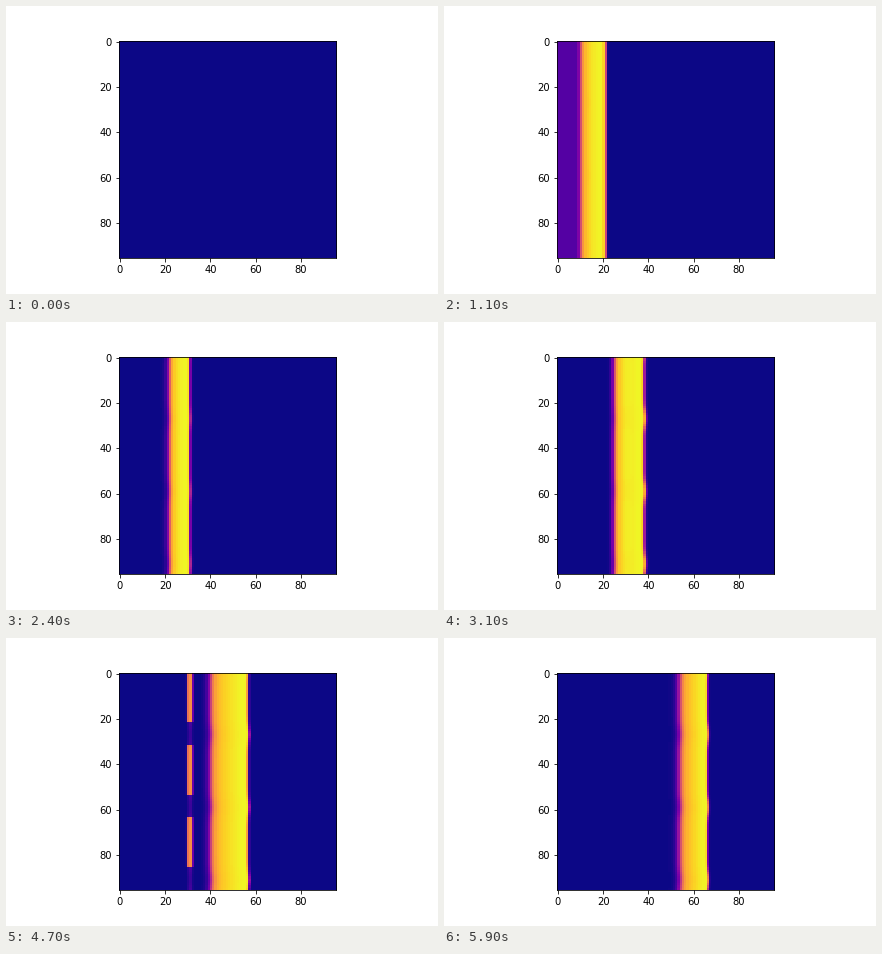
Animation of 432 by 288 pixels, one loop 6 s. Source, as a matplotlib script:

```python
import numpy as np
import matplotlib.pyplot as plt
from matplotlib.animation import FuncAnimation

SIZE = 96
FRAMES = 60
RISE, FALL = 0.28, 0.75

# Key points (time in frames, column) of the wave's two edges.
FRONT = [(0, 9), (7, 15), (11, 21), (21, 28), (28, 34.3), (47, 56.4), (56, 63), (75, 80)]
BACK = [(9.9, 8.5), (24, 21.5), (38, 27.5), (43, 35), (59, 53.3), (80, 78)]

col = np.arange(SIZE)[None, :]
row = np.arange(SIZE)[:, None]


def sigmoid(z):
    return 1 / (1 + np.exp(-np.clip(z, -40, 40)))


def pass_time(points):
    times, columns = zip(*points)
    return np.interp(col, columns, times)


# Every 32 rows the wave runs slightly ahead.
phase = (row - 27 + 16) % 32 - 16
lead = np.exp(-(phase / 4.5) ** 2)
start = pass_time(FRONT) - 0.6 * lead * np.clip((col - 29) / 6, 0, 1)

# A slower edge takes longer to fade.
end = pass_time(BACK)
fall = np.maximum(FALL, 0.6 * np.gradient(end, axis=1))

# A thin strip lingers, and breaks off early in some rows.
strip = np.exp(-((col - 30.5) / 1.8) ** 4)
gap = row % 32 >= 22
end = end - 0.4 * lead * (col > 12) + (8.5 - 3 * gap) * strip


def field(t):
    if t == 0:
        return np.zeros((SIZE, SIZE))
    age = np.clip((t - start) / (end - start), 0, 1)
    plateau = 1 - 0.22 * age ** 1.7
    return plateau * sigmoid((t - start) / RISE) * sigmoid((end - t) / fall)


fig, ax = plt.subplots(figsize=(6, 4), dpi=72)
fig.subplots_adjust(left=0.125, right=0.9, bottom=0.125, top=0.88)
image = ax.imshow(field(0), cmap="plasma", vmin=0, vmax=1, interpolation="nearest")


def update(frame):
    image.set_data(field(frame))
    return (image,)


anim = FuncAnimation(fig, update, frames=FRAMES, interval=100,
                     repeat=True, repeat_delay=0)
plt.show()
```
